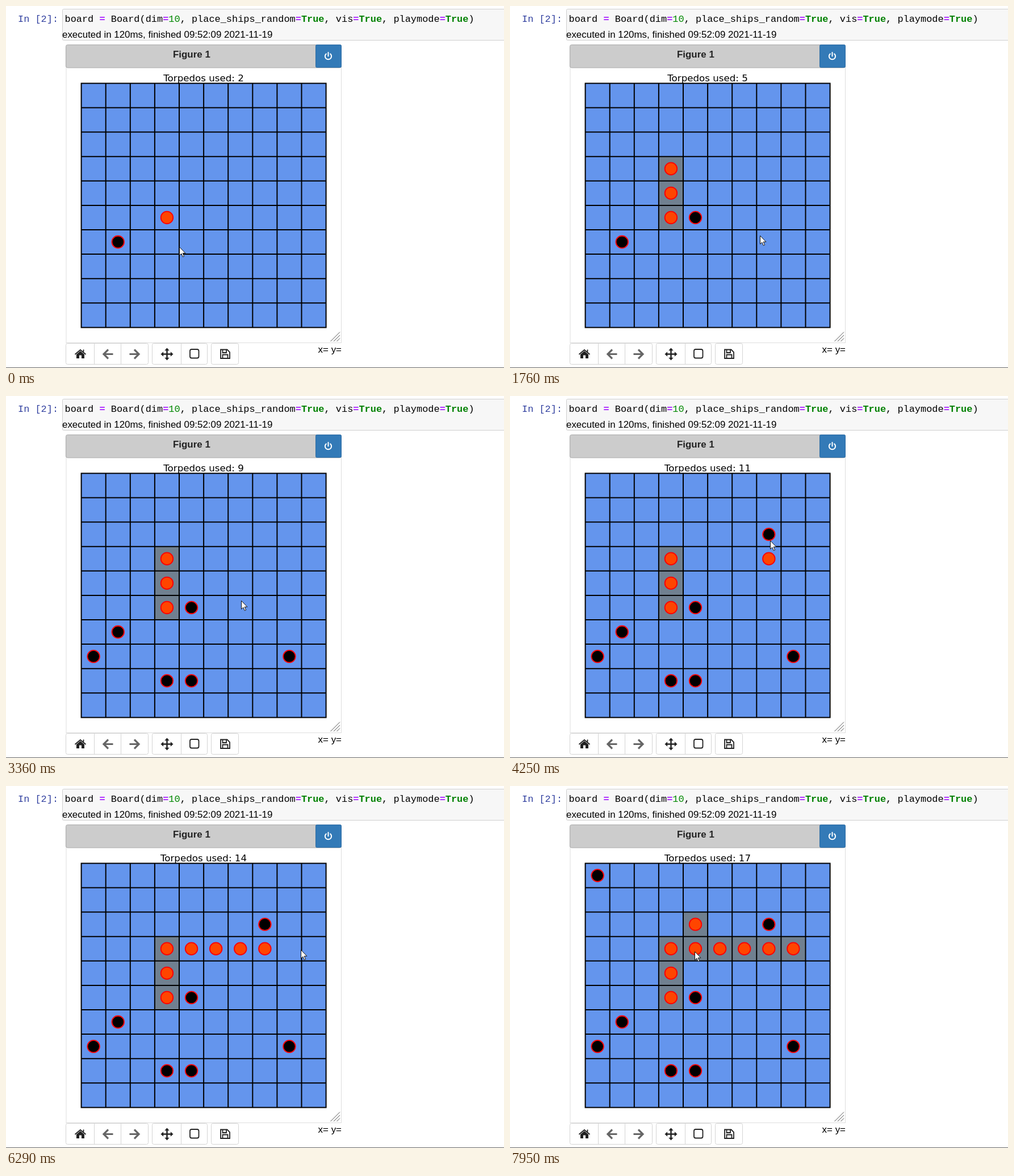
An HTML page that plays this animation: 877x639 px, repeating every 8 s.

```html
<!DOCTYPE html>
<html lang="en">
<head>
<meta charset="utf-8">
<title>Torpedo board</title>
<style>
  html, body { margin: 0; width: 100%; height: 100%; overflow: hidden; background: #fff; }
  svg { display: block; width: 877px; height: 639px; }
  text { white-space: pre; font: 16.93px "Liberation Sans", Arial, sans-serif; }
  .code { font-family: "Liberation Mono", "Courier New", monospace; }
  .op { fill: #a2f; font-weight: bold; }
  .kw { fill: #008000; font-weight: bold; }
  .num { fill: #080; }
  .name { fill: #222; font-weight: bold; }
  #title { font: 16.67px "DejaVu Sans", sans-serif; text-anchor: middle; }
  .btn { fill: #fff; stroke: #d4d4d4; }
  .line { fill: none; stroke: #222; stroke-width: 1.8; }
  .arrow { fill: none; stroke: #666; stroke-width: 3.2; }
</style>
</head>
<body>
<svg viewBox="0 0 877 639">
  <rect x="99.5" y="5.5" width="800" height="55" rx="2" fill="#f7f7f7" stroke="#cfcfcf"/>
  <text class="code" x="21" y="28" fill="#303f9f">In [2]:</text>
  <text class="code" x="103.5" y="28">board <tspan class="op">=</tspan> Board(dim<tspan class="op">=</tspan><tspan class="num">10</tspan>, place_ships_random<tspan class="op">=</tspan><tspan class="kw">True</tspan>, vis<tspan class="op">=</tspan><tspan class="kw">True</tspan>, playmode<tspan class="op">=</tspan><tspan class="kw">True</tspan>)</text>
  <text x="99" y="56">executed in 120ms, finished 09:52:09 2021-11-19</text>

  <rect x="106" y="100" width="484.5" height="494.5" fill="#fff" stroke="#ddd"/>
  <rect x="105.5" y="68.5" width="485" height="40.5" rx="3" fill="#ccc" stroke="#aaa"/>
  <text class="name" x="294" y="91">Figure 1</text>
  <rect x="545.5" y="68.5" width="45" height="40" rx="2" fill="#337ab7" stroke="#2e6da4"/>
  <path d="M563.8 84.5a5.6 5.6 0 1 0 7.4 0M567.5 82v6.5" fill="none" stroke="#fff" stroke-width="2" stroke-linecap="round"/>

  <text id="title" x="348" y="133"></text>
  <rect x="132.6" y="136.4" width="431" height="431" fill="#6495ed"/>
  <g id="wrecks" fill="#708090"></g>
  <path id="grid" fill="none" stroke="#000" stroke-width="2" stroke-linecap="square"/>
  <g id="dots" stroke="#f00" stroke-width="1.8"></g>

  <path d="M571.5 592L588 575.5M577 592L588 581M582.5 592L588 586.5" stroke="#555"/>
  <text id="coords" x="591" y="612" text-anchor="end">x= y=</text>

  <g class="btn">
    <rect x="105.5" y="595.5" width="145" height="37" rx="3"/>
    <rect x="257.5" y="595.5" width="97" height="37" rx="3"/>
    <rect x="361.5" y="595.5" width="48" height="37" rx="3"/>
    <path d="M155.5 596v36M202.5 596v36M308.5 596v36"/>
  </g>
  <path d="M131 609l7 6V622h-5v-5.5h-4V622h-5v-7z" fill="#222"/>
  <path d="M121.5 615L131 607l9.5 8M136.500 606.5v4" class="line"/>
  <path id="arrow" class="arrow" d="M188.5 614.5H173M180 606.5l-8 8 8 8"/>
  <use href="#arrow" transform="translate(406) scale(-1 1)"/>
  <path d="M275 614.5h17M283.5 606v17" class="line" style="stroke-width:2.5"/>
  <g id="tips" fill="#222"></g>
  <rect x="324" y="606" width="15.5" height="15.5" rx="3" class="line"/>
  <path d="M378 606.5h11.5l4.5 4.5v11H378zM381.5 622v-6.5h9v6.5M381.5 606.5v5.5h6.5v-5.5" class="line"/>
  <path d="M0 638.5H877" stroke="#666"/>

  <path id="cursor" d="M.5 .5v14.7l3.3-3.1 2.5 5.7 2.3-1-2.4-5.5h4.7z" fill="#fff" stroke="#111"/>
</svg>
<script>
const LOOP = 8000, X0 = 132.6, Y0 = 136.4, CELL = 43.1;
const $ = id => document.getElementById(id);

// column, row, columns, rows
const ships = [[3, 3, 1, 3], [5, 3, 4, 1], [4, 2, 1, 2]];

// time and cell: columns A to J, rows 0 to 9
const shots = [
  [-2, "B6"], [-1, "D5"], [330, "E5"], [980, "D4"], [1310, "D3"], [2030, "I7"],
  [2270, "D8"], [2680, "A7"], [3160, "E8"], [3450, "H3"], [4060, "H2"], [5020, "G3"],
  [5310, "F3"], [5660, "E3"], [6650, "I3"], [7280, "A0"], [7800, "E2"]
].map(([at, cell]) => ({ at, col: cell.charCodeAt(0) - 65, row: +cell[1] }));

// time, x, y
const path = [
  [0, 305, 425], [420, 327, 374], [580, 322, 371], [760, 243, 342], [1040, 282, 326],
  [1160, 281, 302], [1400, 284, 276], [1500, 310, 248], [1880, 499, 477], [2030, 495, 478],
  [2250, 283, 514], [2450, 197, 433], [2600, 152, 464], [2700, 154, 465], [2830, 228, 483],
  [2920, 344, 500], [3160, 344, 500], [3480, 455, 279], [3660, 453, 277], [3820, 383, 262],
  [3980, 460, 243], [4250, 458, 255], [4480, 459, 281], [4700, 455, 336], [5060, 411, 293],
  [5220, 368, 292], [5480, 339, 292], [5720, 328, 291], [6110, 538, 291], [6450, 503, 288],
  [6860, 498, 284], [7010, 322, 125], [7070, 322, 125], [7130, 160, 150], [7280, 160, 150],
  [7460, 328, 305], [7620, 326, 250], [7800, 326, 250], [7940, 325, 292]
];

function add(parent, tag, attrs) {
  const el = document.createElementNS("http://www.w3.org/2000/svg", tag);
  for (const key in attrs) el.setAttribute(key, attrs[key]);
  return $(parent).appendChild(el);
}

function inside([col, row, w, h], shot) {
  return shot.col >= col && shot.col < col + w && shot.row >= row && shot.row < row + h;
}

let lines = "";
for (let i = 0; i <= 10; i++)
  lines += `M${X0 + i * CELL} ${Y0}v431M${X0} ${Y0 + i * CELL}h431`;
$("grid").setAttribute("d", lines);

for (let i = 0; i < 4; i++)
  add("tips", "path", { d: "M0-11l4.2 4.7h-8.4z", transform: `translate(283.5 614.5) rotate(${i * 90})` });

const timed = shots.map(shot => [shot.at, add("dots", "circle", {
  cx: X0 + (shot.col + .5) * CELL, cy: Y0 + (shot.row + .5) * CELL, r: 10.8,
  fill: ships.some(ship => inside(ship, shot)) ? "#ff4500" : "#000"
})]);

// A ship shows once its last cell is hit. The first cell of the last one is hit last.
for (const ship of ships) {
  const [col, row, w, h] = ship;
  const sunk = Math.max(...shots.filter(shot => inside(ship, shot)).map(shot => shot.at));
  timed.push([sunk, add("wrecks", "rect", {
    x: X0 + col * CELL, y: Y0 + row * CELL, width: w * CELL, height: h * CELL
  })]);
}

function show(el, on) {
  el.style.display = on ? "" : "none";
}

function draw(t) {
  for (const [at, el] of timed) show(el, t >= at);
  $("title").textContent = "Torpedos used: " + shots.filter(shot => t >= shot.at).length;
  show($("coords"), t < 7070 || t >= 7130);

  const next = path.findIndex(p => p[0] > t);
  const [t1, x1, y1] = path.at(next), [t0, x0, y0] = next < 0 ? path.at(-1) : path[next - 1];
  const k = (t - t0) / (t1 - t0 || 1);
  const x = Math.round(x0 + (x1 - x0) * k), y = Math.round(y0 + (y1 - y0) * k);
  $("cursor").setAttribute("transform", `translate(${x} ${y})`);
}

const start = performance.now();
function tick() {
  draw((performance.now() - start) % LOOP);
  requestAnimationFrame(tick);
}
tick();
</script>
</body>
</html>
```
